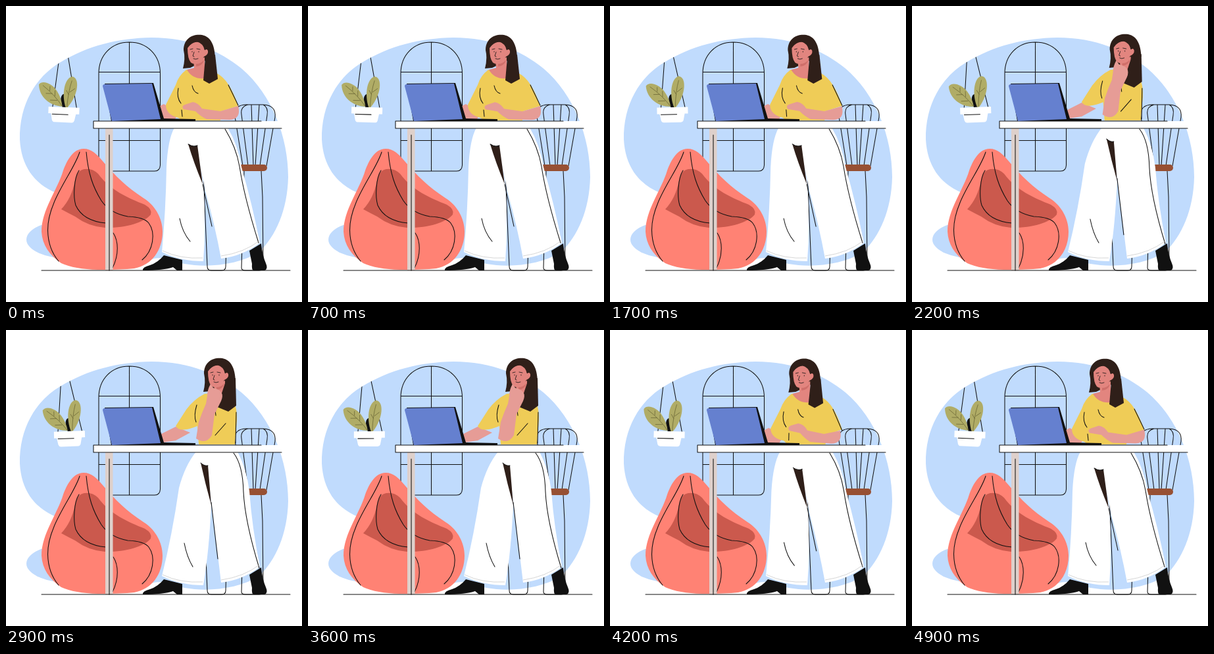
An HTML page for the animation above (5 s loop, 450 by 450 pixels).

```html
<!DOCTYPE html>
<html lang="en">
<head>
<meta charset="utf-8">
<title>Working at the desk</title>
<style>
html, body { margin: 0; height: 100%; overflow: hidden; background: #fff; }
svg { display: block; width: 100%; height: 100%; }
.line { fill: none; stroke: #111; stroke-width: 1.05; stroke-linecap: round; stroke-linejoin: round; }
.sky { fill: #c0dbfd; }
.skin { fill: #e69c96; }
.face { fill: #e2857f; }
.shirt { fill: #efcc57; }
.hair { fill: #2f1f19; }
.white { fill: #fff; }
.leaf { fill: #b0ac66; }
.vein { fill: none; stroke: #74703c; stroke-width: .9; }
</style>
</head>
<body>
<svg viewBox="0 0 450 450">
  <defs>
    <path id="blob" d="M21 203C20 150 45 108 82 86C125 60 170 49 221 48C280 48 325 68 358 95C405 135 429 200 429 260C428 310 410 350 385 374C345 399 280 400 245 384Q230 381 218 386L130 340L76 284C42 270 23 242 21 203Z"/>
    <clipPath id="wall"><use href="#blob"/></clipPath>
  </defs>
  <use href="#blob" class="sky"/>
  <ellipse class="sky" cx="95" cy="355" rx="64" ry="29"/>

  <!-- window -->
  <path class="line" d="M141 103C141 74 161 55 187.5 55S234.5 74 234.5 103V242Q234 251 226 251H150Q141 251 141 242ZM187.5 55V251M141 100.5H234M141 204.5H234"/>

  <!-- hanging plant -->
  <g clip-path="url(#wall)"><path class="line swing" d="M86 40L75 156M88 40L112 156"/></g>
  <g class="swing">
    <path d="M90 154Q84 138 91 134Q99 138 96 154Z" fill="#111"/>
    <path class="leaf" d="M95 154C88 136 91 110 103 107C115 108 114 134 98 154Z"/>
    <path class="vein" d="M97 153Q98 130 103 113M99 135L95 128M100 131L108 125"/>
    <path class="leaf" d="M90 153C71 153 54 140 53 121C58 113 74 119 81 130Q88 140 90 153Z"/>
    <path class="vein" d="M90 153Q78 136 59 122M70 130V123M78 138V129M74 134H64M82 144H71"/>
    <path class="white" d="M69 154H116V164H111L109 174Q108 177 105 177H79Q76 177 75 174L73 164H69Z"/>
    <path class="line" d="M75 165H99"/>
  </g>

  <!-- chair -->
  <path class="line" d="M360 243L348 168Q346 150 366 150H391Q411 151 409 169L396 243M368 243L358 165Q356 153 368 150M376 243L373 150M379 243L385 150M386 243L397 166Q399 154 391 150"/>
  <path class="line" d="M300 251L306 396Q306 402 312 402H328Q334 402 334 396L338 251M362 251L358 398Q358 402 364 402H385Q391 402 391 395L390 290L388 251"/>
  <rect x="345" y="241" width="52" height="10" rx="5" fill="#975033"/>

  <!-- beanbag -->
  <path d="M118 217C101 217 92 237 87 250C78 280 54 310 54 343C55 363 66 379 84 391Q104 400 140 401Q175 401 195 399C222 394 238 371 238 343C238 324 228 304 209 292C183 275 166 258 148 237C138 225 130 217 118 217Z" fill="#ff8274"/>
  <path d="M119 248Q131 246 140 255C158 280 186 292 211 302Q223 309 220 317C210 330 178 338 150 337Q125 335 105 320Q95 315 84 309Q100 292 105 265Q108 250 119 248Z" fill="#cb594d"/>
  <path class="line" d="M112 222C103 252 63 296 63.500 341Q64 369 80 388M122 222C125 255 132 275 145 296Q158 315 185 320Q210 321 217 330C228 345 224 372 207 386M111 250C103 262 102 290 106 303Q117 327 152 330M163 345C171 357 172 378 162 398"/>

  <!-- woman -->
  <path d="M208 402Q207 397 219 394Q231 390 240 379L268 386V402H260L254 397Q240 402 208 402Z" fill="#111"/>
  <path d="M370 372L388 361Q390 380 395 391Q399 400 393 402H377Q373 402 374 392Z" fill="#111"/>
  <path id="legL" class="white"/>
  <path id="legR" class="white"/>
  <path id="gap" class="hair"/>
  <path id="creases" class="line"/>
  <path d="M238 372Q265 385 299 383M327 380Q362 375 385 357" fill="none" stroke="#ccc" stroke-width=".8"/>
  <path id="armL" class="skin"/>
  <path id="torso" class="shirt"/>
  <path id="folds" class="line"/>
  <g id="head">
    <path class="hair" d="M269 95Q273 80 270 67C270 50 283 42 298 44C312 47 317 60 318 78L301 84L280 94Z"/>
    <path class="face" d="M285 82L302 78V110Q284 112 275 97L286 94Z"/>
    <path d="M289 88Q296 88 301 82Q299 91 289 92Z" fill="#cf6f6a"/>
    <path class="face" d="M276 64Q276 80 281 86Q286 90 294 86L301 77Q308 74 307 68Q305 64 302 67L300 57Q285 50 276 64Z"/>
    <path class="hair" d="M273 68Q278 57 290 54Q300 57 302 67L307 65V50L284 46Z"/>
    <path class="line" style="stroke-width:.8" d="M280 66L284 65M290 65L295 66M283 69V70M293 69V70M286 70L284 76L286 77M285 80Q288 82 292 80"/>
  </g>
  <path id="tail" class="hair"/>
  <path id="armR" class="skin"/>

  <!-- desk and laptop -->
  <path class="white" d="M133 175H419V186H133Z"/>
  <path d="M151 186H162.500V402H151Z" fill="#ded0cb"/>
  <path class="line" d="M157 196V402M388 175H133V186H419"/>
  <path d="M150 118L224 117L240 171L288 172V175H160Z" fill="#111"/>
  <path d="M150 119L222 118L235 172L161 175L147 122Q147 119 150 119Z" fill="#6580cf"/>
  <path class="line" d="M54 402H432"/>
</svg>
<script>
// Each shape: path when typing, path when thinking
const poses = {
  legL: ["M256 185Q246 203 244 245Q243 310 237 374Q265 388 300 388Q304 335 300 272L290 212L300 185Z",
         "M289 185Q272 206 263 240Q253 310 237 374Q265 388 300 388Q309 335 312 265L305 208L320 185Z"],
  legR: ["M270 185L288 212Q297 250 304 285Q318 335 327 384Q360 380 386 360Q374 300 358 245Q353 212 337 185Z",
         "M290 185L304 208Q310 240 313 270Q320 325 327 384Q360 380 386 360Q374 300 370 245Q366 212 352 185Z"],
  gap: ["M277 210Q284 215 291 212L299 271Q285 237 277 210Z",
        "M296 202Q301 207 307 206L312 266Q303 234 296 202Z"],
  creases: ["M333 187Q350 215 355 244Q362 290 384 360M264 323Q268 344 280 358M277 210Q284 215 291 212M299 271L313 335",
            "M346 187Q360 205 361 246Q363 290 385 362M271 324Q275 345 284 360M296 202Q301 207 307 206M312 262L322 348"],
  armL: ["M240 149L262 163L256 174L236 174L234 152Z",
         "M258 147L280 156L258 168L238 171L236 158Z"],
  torso: ["M274 97Q262 106 258 120L243 150Q243 165 262 170L268 174L326 174L327 160L353 152Q340 112 320 102L300 95Z",
          "M302 97Q286 105 274 121L258 146Q264 157 291 146L293 174L348 174L349 160L351 138Q352 112 340 101L328 95Z"],
  folds: ["M262 125Q259 139 266 148M283 121Q285 131 292 133M338 120L353 151M267 158L268 168",
          "M290 114Q285 130 289 140M319 119Q318 125 319 130M350 125L349 172M334 142L318 160"],
  tail: ["M303 78L300 113L309 118L322 111L318 74Z",
         "M334 78L321 117L338 124L350 115L349 73Z"],
  armR: ["M353 152Q358 172 340 173L305 172Q296 168 288 160L270 157Q266 152 272 150L284 146Q292 147 298 156L326 160Z",
         "M313 160Q304 175 289 165L293 140Q298 125 304 112L306 100Q306 91 311 82L315 88Q334 92 327 108L317 128Z"]
};
const $ = id => document.getElementById(id);
const nums = /\d+(\.\d+)?/g;

function mix(a, b, k) {
  const to = b.match(nums);
  let i = 0;
  return a.replace(nums, n => (+n + (to[i++] - n) * k).toFixed(2));
}

function ease(t, from, to) {
  const u = Math.min(1, Math.max(0, (t - from) / (to - from)));
  return u < .5 ? 4 * u ** 3 : 1 - 4 * (1 - u) ** 3;
}

function draw(now) {
  const t = now % 5000;
  const k = ease(t, 1600, 2300) - ease(t, 3650, 4400);
  for (const id in poses) $(id).setAttribute("d", mix(...poses[id], k));
  $("head").setAttribute("transform", `translate(${31 * k} ${-k})`);
  const tap = Math.sin(t * Math.PI / 250) * .6 * (1 - k);
  $("armR").setAttribute("transform", `translate(0 ${tap})`);
  const tilt = 2.3 * Math.cos(t * Math.PI / 2500);
  for (const el of document.querySelectorAll(".swing"))
    el.setAttribute("transform", `rotate(${tilt} 92.5 46)`);
}

function loop() {
  draw(performance.now());
  requestAnimationFrame(loop);
}
loop();
</script>
</body>
</html>
```
